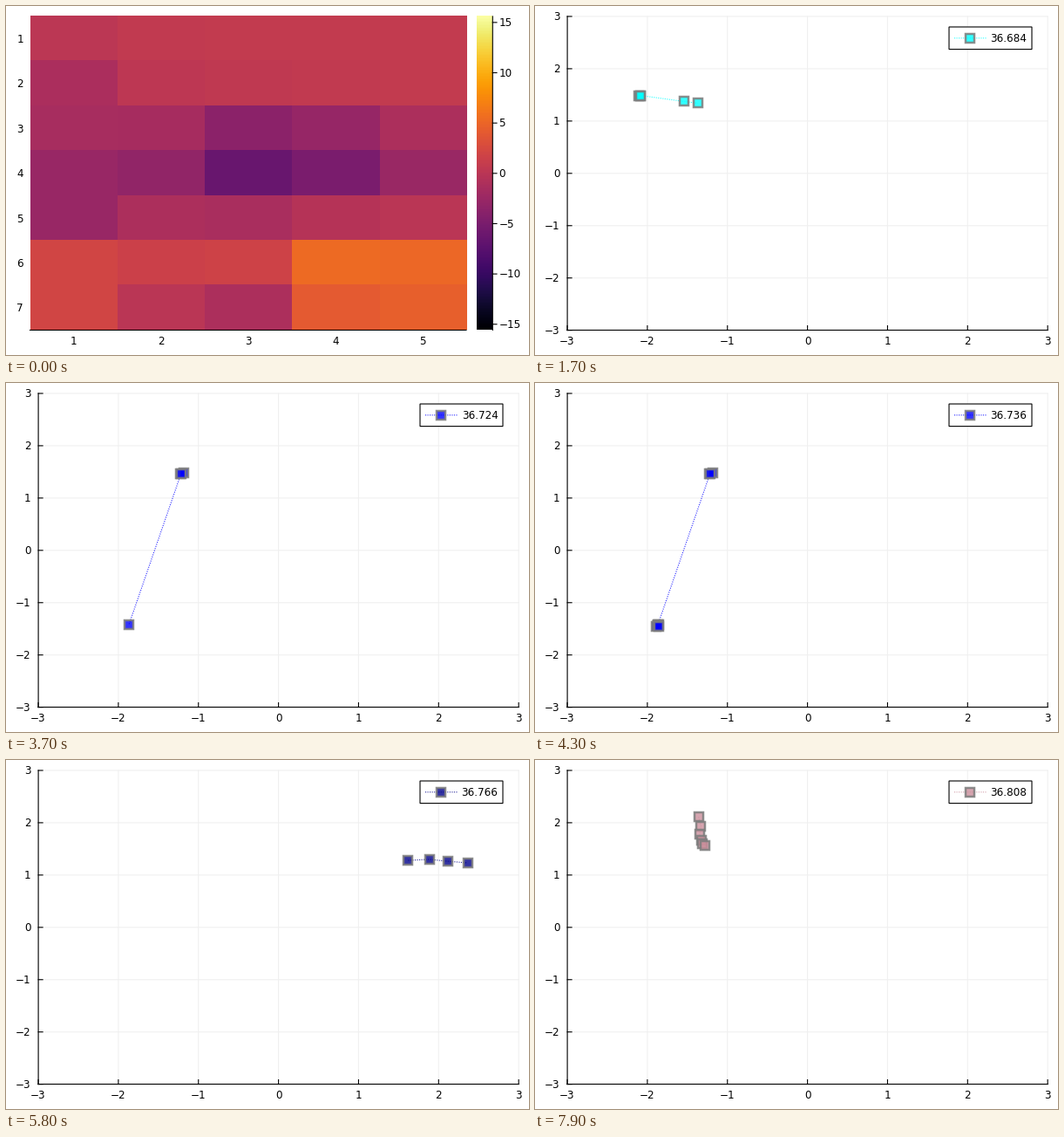
Animation, 600 px wide and 400 px high, one loop 8 s. Source, as a matplotlib script:

```python
import numpy as np
import matplotlib.pyplot as plt
from matplotlib.animation import FuncAnimation
from matplotlib.patches import Rectangle

PX = 0.72  # points per pixel at 100 dpi
FRAMES, INTERVAL = 80, 100
FIRST_TIME, TIME_STEP, FIRST_FRAME = 36.668, 0.002, 9
LIMIT = 15.58  # colour range of the heatmap
TOP, BOTTOM, RIGHT = 11.9, 371.5, 588.2

plt.rcParams["font.family"] = "DejaVu Sans"
plt.rcParams["font.size"] = 12 * PX

CYAN, BLUE, NAVY, ROSE = "#00ffff", "#0000ff", "#00008b", "#cc8f9c"

# first frame, colour, start, end, steps to wait, steps to travel
RUNS = [
    (9, CYAN, (-1.9, 1.21), (-2.03, 1.42), 0, 4),
    (13, CYAN, (-2.11, 1.48), (-1.36, 1.33), 2, 2),
    (24, BLUE, (1.19, 1.89), (1.62, 2.1), 0, 6),
    (34, BLUE, (-1.23, 1.47), (-1.87, -1.43), 2, 1),
    (49, NAVY, (0.95, 2.01), (-1.88, -2.55), 1, 1),
    (55, NAVY, (1.62, 1.28), (2.5, 1.25), 0, 5),
    (65, ROSE, (2.8, 1.2), (-1.76, -1.42), 4, 1),
    (74, ROSE, (-1.36, 2.11), (-1.31, 1.55), 0, 5),
]
PAUSES = [(30, 34), (60, 65)]  # nothing new is drawn in between

fig = plt.figure(figsize=(6, 4), dpi=100, facecolor="white")
stage = fig.add_axes([0, 0, 1, 1])
stage.axis("off")


def map_x(value):
    return 312.6 + 91.85 * value


def map_y(value):
    return 191.8 - 59.95 * value


def line(xs, ys, color="black", width=1.1, **kw):
    return stage.plot(xs, ys, color=color, lw=width * PX, snap=False, **kw)[0]


def label(x, y, value, ha="center"):
    text = str(value).replace("-", "\u2212")
    return stage.text(x, y - 0.7, text, ha=ha, va="center_baseline")


def image(data, left, right):
    return stage.imshow(data, cmap="inferno", vmin=-LIMIT, vmax=LIMIT,
                        extent=(left, right, BOTTOM, TOP), aspect="auto",
                        interpolation="nearest")


def bump(col, row, height, width):
    cols, rows = np.meshgrid(np.arange(1, 6), np.arange(1, 8))
    distance = (cols - col) ** 2 + (rows - row) ** 2
    return height * np.exp(-distance / (2 * width ** 2))


def cell_values():
    rows = np.arange(1, 8)[:, None]
    wave = (0.7 + 0.35 * rows) * np.cos(2 * np.pi * (rows - 6.4) / 5) - 0.3
    return (wave + bump(3.3, 3.7, -4.8, 0.7) + bump(4.4, 6.4, 4.4, 0.8)
            + bump(2.8, 7, -4, 0.7) + bump(1, 5, -2, 0.5) + bump(1, 2, -2, 0.6))


def draw_heatmap():
    ramp = np.linspace(LIMIT, -LIMIT, 256)[:, None]
    parts = [image(cell_values(), 27.5, 528), image(ramp, 540, 558),
             line([27.5, 528], [BOTTOM, BOTTOM]),
             line([558.3, 558.3], [TOP, BOTTOM])]
    parts += [label(77.7 + 100.1 * i, 383.5, i + 1) for i in range(5)]
    parts += [label(16, 37.7 + 51.4 * i, i + 1) for i in range(7)]
    for value in range(-15, 16, 5):
        y = 191.8 - 11.53 * value
        parts += [line([558.3, 563], [y, y]), label(565.5, y, value, "left")]
    return parts


def draw_axes():
    left = 37.1
    parts = [line([left, left], [TOP, BOTTOM]), line([left, RIGHT], [BOTTOM, BOTTOM])]
    for value in range(-3, 4):
        x, y = map_x(value), map_y(value)
        parts += [line([x, x], [TOP, BOTTOM], "#f0f0f0", zorder=1),
                  line([left, RIGHT], [y, y], "#f0f0f0", zorder=1),
                  line([x, x], [BOTTOM, BOTTOM - 5]),
                  line([left, left + 5], [y, y]),
                  label(x, 383.5, value),
                  label(28.7, y, value, "right")]
    return parts


def trail(zorder):
    dots = line([], [], ls=(0, (1, 1.3)), alpha=0.85, zorder=zorder)
    marks = line([], [], ls="none", marker="s", ms=9.4 * PX, mew=2.5 * PX,
                 mec=(0.49, 0.49, 0.49, 0.87), zorder=zorder + 1)
    return dots, marks


def set_trail(parts, xs, ys, mark_xs, mark_ys, color):
    dots, marks = parts
    dots.set_data(xs, ys)
    dots.set_color(color)
    marks.set_data(mark_xs, mark_ys)
    marks.set_markerfacecolor((color, 0.8))


def run_points(first, start, end, wait, travel, count):
    steps = np.arange(count)
    progress = np.sin(np.pi / 2 * np.clip((steps - wait) / travel, 0, 1))
    wobble = np.random.default_rng(first).normal(0, 0.02, (count, 2))
    wobble[0] = 0
    start, end = np.array(start), np.array(end)
    return (start + progress[:, None] * (end - start) + wobble).T


heatmap = draw_heatmap()
plot_parts = draw_axes()
path = trail(4)
legend_box = stage.add_patch(Rectangle((475, 24), 95, 25.6, fc="white", ec="black",
                                       lw=1.1 * PX, zorder=6, snap=False))
legend_key = trail(7)
legend_text = label(564.5, 37, "", "right")
legend_text.set_zorder(8)
plot_parts += [*path, *legend_key, legend_box, legend_text]
stage.set(xlim=(0, 600), ylim=(400, 0))


def update(frame):
    plotting = frame >= FIRST_FRAME
    for part in heatmap:
        part.set_visible(not plotting)
    for part in plot_parts:
        part.set_visible(plotting)
    if not plotting:
        return

    for held, resumed in PAUSES:
        if held < frame < resumed:
            frame = held
    first, color, *motion = [run for run in RUNS if run[0] <= frame][-1]
    xs, ys = run_points(first, *motion, frame - first + 1)
    xs, ys = map_x(xs), map_y(ys)
    set_trail(path, xs, ys, xs, ys, color)

    time = FIRST_TIME + TIME_STEP * (frame - FIRST_FRAME)
    text = f"{time:.3f}".rstrip("0")
    legend_text.set_text(text)
    left = 475 + 7.63 * (6 - len(text))
    legend_box.set_x(left)
    legend_box.set_width(570 - left)
    set_trail(legend_key, [left + 6, left + 43], [36.8, 36.8],
              [left + 24.3], [36.8], color)


anim = FuncAnimation(fig, update, frames=FRAMES, interval=INTERVAL,
                     init_func=lambda: update(0), repeat=True, repeat_delay=0)
plt.show()
```
